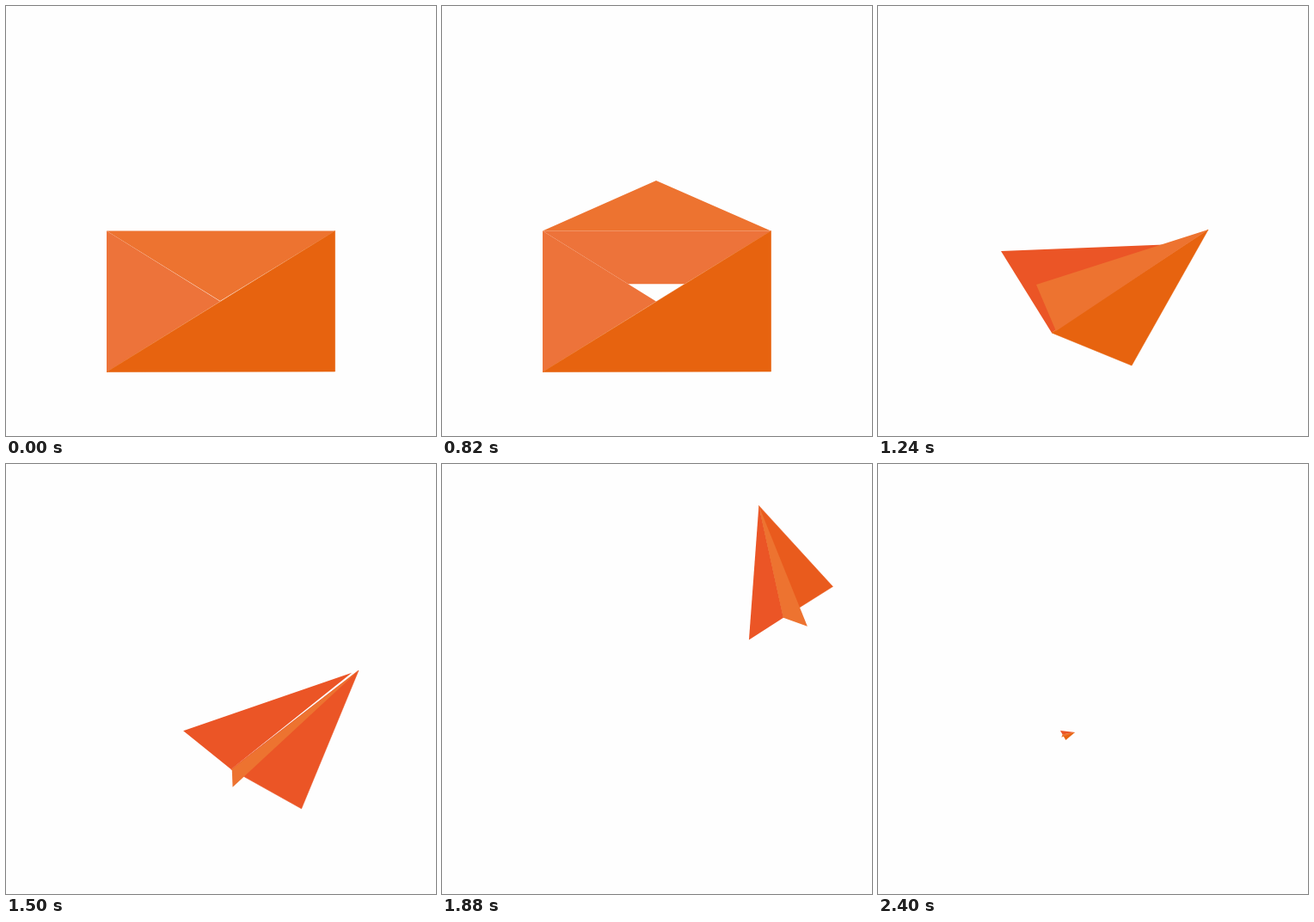
An HTML page with a canvas for the animation above (2420 ms loop, 500 by 500 pixels).

```html
<!DOCTYPE html>
<html>
<head>
<meta charset="utf-8">
<style>
html, body { margin: 0; width: 100%; height: 100%; overflow: hidden; background: #fefefe; }
canvas { display: block; width: 500px; height: 500px; }
</style>
</head>
<body>
<canvas id="stage" width="500" height="500"></canvas>
<script>
const ctx = document.getElementById('stage').getContext('2d');
const LOOP = 2420, STEP = 20;
const DARK = [231, 99, 15], LIGHT = [237, 115, 48], PANEL = [237, 115, 58], RED = [235, 85, 38];

// Envelope corners and centre
const TL = [117, 261.5], TR = [382.5, 261.5], BR = [382.5, 425], BL = [117, 425.5], MID = [249, 343.5];

// Plane triangles relative to the nose: just folded, then in flight
const FOLDED = {
  left: [[-241, 25], [-39, 17], [-182, 120]],
  right: [[0, 0], [-89, 158], [-182, 120]],
  keel: [[-200, 64], [0, 0], [-177, 118]]
};
const FLYING = {
  left: [[-177, 93], [0, 0], [-122, 119]],
  right: [[0, 0], [-44, 157], [-122, 119]],
  keel: [[-114, 156], [0, 0], [-122, 119]]
};

// Flight path: time, nose x, nose y, turn in degrees, scale
const PATH = [
  [1240, 384, 260, 0, 1],
  [1500, 410, 240, 4, 1.05],
  [1720, 459, 153, 0, 1],
  [1800, 444, 86, -22, .89],
  [1930, 312, 39, -82, .715],
  [2060, 154, 82, -142, .535],
  [2120, 83, 130, -173, .453],
  [2180, 40, 195, -205, .375],
  [2240, 55, 262, -240, .297],
  [2340, 175, 308, -299, .165],
  [2400, 229, 312, -326, .086]
];

const progress = (t, from, to) => Math.min(1, Math.max(0, (t - from) / (to - from)));
const easeInOut = (p, n) => p < .5 ? (2 * p) ** n / 2 : 1 - (2 - 2 * p) ** n / 2;
const mix = (a, b, p) => a.map((v, i) => v + (b[i] - v) * p);
const mixAll = (a, b, p) => a.map((v, i) => mix(v, b[i], p));

function fill(points, color, bleed) {
  ctx.beginPath();
  points.forEach(p => ctx.lineTo(p[0], p[1]));
  ctx.closePath();
  ctx.fillStyle = ctx.strokeStyle = `rgb(${color.map(Math.round)})`;
  ctx.fill();
  if (bleed) {
    ctx.lineWidth = bleed;
    ctx.stroke();
  }
}

// Smooth curve through the path keys
function poseAt(t) {
  let i = 0;
  while (i < PATH.length - 2 && t >= PATH[i + 1][0]) i++;
  const a = PATH[i], b = PATH[i + 1], span = b[0] - a[0];
  const before = PATH[Math.max(0, i - 1)], after = PATH[Math.min(PATH.length - 1, i + 2)];
  const u = (t - a[0]) / span, u2 = u * u, u3 = u2 * u;
  return [1, 2, 3, 4].map(k => {
    const va = (b[k] - before[k]) / (b[0] - before[0]);
    const vb = (after[k] - a[k]) / (after[0] - a[0]);
    return (2 * u3 - 3 * u2 + 1) * a[k] + (3 * u2 - 2 * u3) * b[k]
      + span * ((u3 - 2 * u2 + u) * va + (u3 - u2) * vb);
  });
}

function drawEnvelope(t) {
  const open = easeInOut(progress(t, 60, 560), 2) - easeInOut(progress(t, 720, 1096), 2);
  const fold = easeInOut(progress(t, 920, 1260), 3);
  const inside = 1 - progress(t, 720, 1125);
  const [, noseX, noseY] = PATH[0];
  const toPlane = (points, part) =>
    mixAll(points, FOLDED[part].map(([x, y]) => [x + noseX, y + noseY]), fold);

  const left = toPlane([TL, MID, BL], 'left');
  const right = toPlane([TR, BR, BL], 'right');
  const flap = toPlane([TL, TR, [249, 343 - 163 * open]], 'keel');

  if (t > 60 && inside > 0) {
    fill([left[0], right[0], mix(right[0], left[1], inside), mix(left[0], left[1], inside)], PANEL);
  }
  fill(left, mix(PANEL, RED, fold));
  fill(flap, LIGHT);
  fill(right, DARK, .6);
  if (fold > .5) fill(flap, LIGHT);
}

function drawPlane(t) {
  const [x, y, turn, scale] = poseAt(t);
  const shape = progress(t, 1240, 1560);
  const shade = progress(t, 1240, 1500) - progress(t, 1800, 2000);
  const part = name => mixAll(FOLDED[name], FLYING[name], shape);
  ctx.save();
  ctx.translate(x, y);
  ctx.rotate(turn * Math.PI / 180);
  ctx.scale(scale, scale);
  fill(part('left'), RED);
  fill(part('right'), mix(DARK, RED, shade), .6);
  fill(part('keel'), LIGHT);
  ctx.restore();
}

function draw(now) {
  const t = Math.floor(now % LOOP / STEP) * STEP;
  ctx.fillStyle = '#fefefe';
  ctx.fillRect(0, 0, 500, 500);
  (t < 1240 ? drawEnvelope : drawPlane)(t);
  requestAnimationFrame(draw);
}

const start = performance.now();
draw(0);
function tick() { return performance.now() - start; }
</script>
</body>
</html>
```
